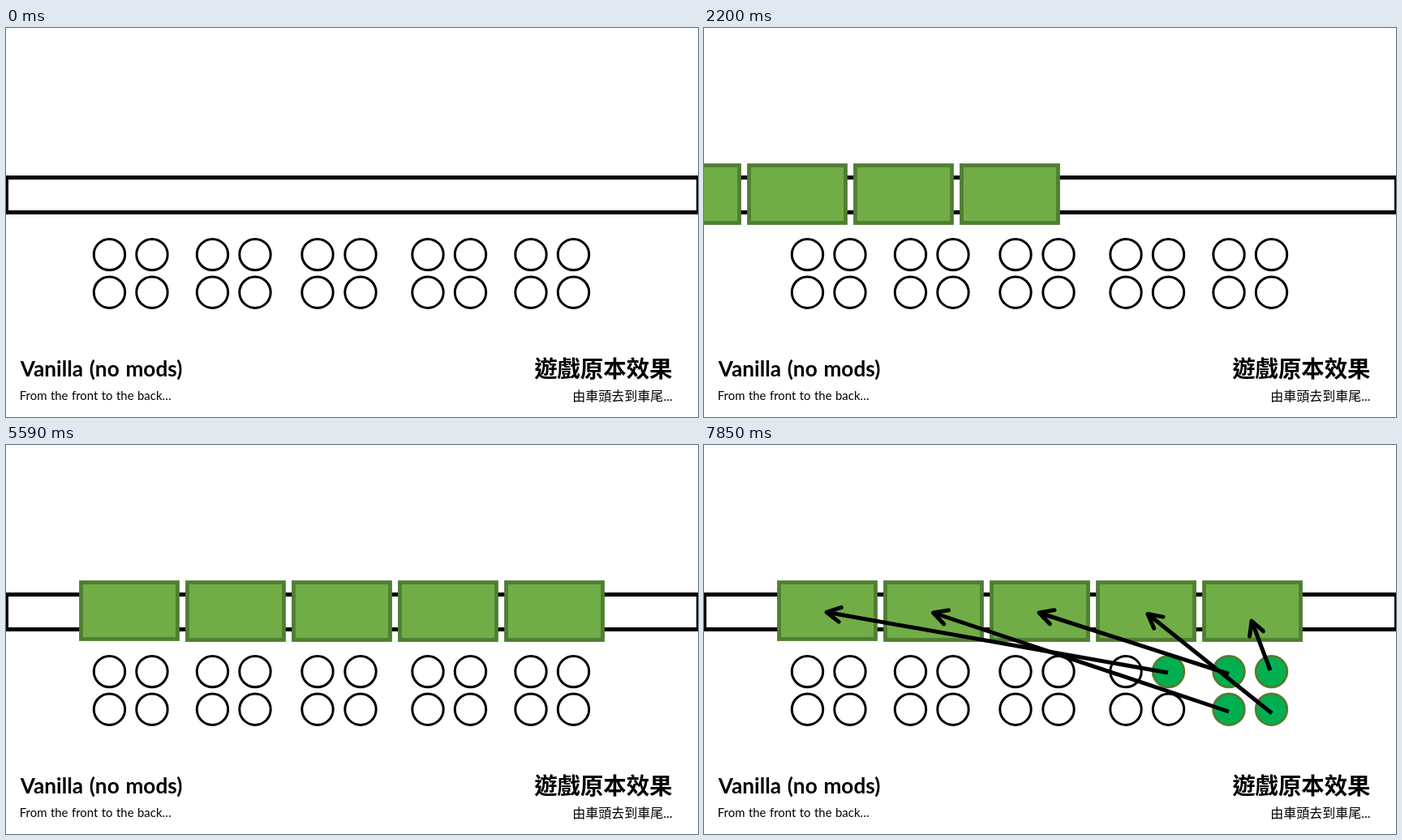
Write an HTML page that moves like this. It is 853 px wide and 480 px high and loops after 8000 ms.

```html
<!DOCTYPE html>
<html lang="zh-Hant">
<head>
<meta charset="utf-8">
<title>Train boarding order</title>
<style>
  html, body { margin: 0; width: 100%; height: 100%; overflow: hidden; background: #fff; }
  svg { display: block; width: 100vw; height: 100vh; }
  text { font-family: Lato, "Noto Sans CJK TC", "Noto Sans CJK JP", "Noto Sans CJK", sans-serif; }
  .track, .seat { fill: #fff; stroke: #000; }
  .track { stroke-width: 5; }
  .seat { stroke-width: 3; }
  .seat.taken { fill: #00b050; stroke: #507e32; }
  .car { fill: #70ad47; stroke: #507e32; stroke-width: 4.8; }
  .arrow { fill: none; stroke: #000; stroke-width: 5; }
  .head { stroke-linecap: round; stroke-linejoin: round; }
  .end { text-anchor: end; }
  .title { font-weight: 700; }
</style>
</head>
<body>
<svg viewBox="0 0 853 480">
  <rect class="track" x="0.5" y="184.5" width="853" height="43"/>
  <g id="train"></g>
  <g id="seats"></g>
  <g id="arrows"></g>
  <text class="title" x="17.8" y="430" font-size="26.2" word-spacing="1.4">Vanilla (no mods)</text>
  <text x="16.8" y="459" font-size="14.9" word-spacing="0.7">From the front to the back…</text>
  <text class="title end" x="821.5" y="430.5" font-size="28.4">遊戲原本效果</text>
  <text class="end" x="821.5" y="459.5" font-size="16">由車頭去到車尾...</text>
</svg>
<script>
const LOOP = 8000, FIRST_STEP = 1070, STEP = 1130;
const [train, seats, arrows] = ["train", "seats", "arrows"].map(id => document.getElementById(id));

function add(parent, tag, attrs) {
  const node = document.createElementNS("http://www.w3.org/2000/svg", tag);
  for (const name in attrs) node.setAttribute(name, attrs[name]);
  return parent.appendChild(node);
}

for (let i = 0; i < 5; i++) {
  add(train, "rect", {
    class: "car", x: 92.5 + 131 * i, y: 169.5, width: 119, height: i ? 71 : 70
  });
}

// Seats are ordered top, bottom for each column.
const seatNodes = [];
for (const x of [127.5, 180, 254.5, 307, 384, 437, 520, 572.5, 647, 699.5]) {
  for (const y of [279.6, 326.2]) {
    seatNodes.push(add(seats, "circle", { class: "seat", cx: x, cy: y, r: 19.2 }));
  }
}
const takenSeats = [14, 16, 17, 18, 19].map(i => seatNodes[i]);

function addArrow(x1, y1, x2, y2) {
  const length = Math.hypot(x2 - x1, y2 - y1);
  const ux = (x2 - x1) / length, uy = (y2 - y1) / length;
  const wing = side => `${x2 - 17 * ux - side * uy} ${y2 - 17 * uy + side * ux}`;
  add(arrows, "path", { class: "arrow", d: `M${x1} ${y1}L${x2} ${y2}` });
  add(arrows, "path", { class: "arrow head", d: `M${wing(-9)}L${x2} ${y2}L${wing(9)}` });
}
addArrow(698, 278, 675, 217);
addArrow(700, 331, 547, 208.5);
addArrow(647, 282.5, 413, 207);
addArrow(647, 329, 282.5, 207);
addArrow(572, 281, 151, 206.3);

// Train offset from its stop, one entry per step.
const offsets = [-900, -636, -299, -95, -24.6, 0];

function draw(now) {
  const time = now % LOOP;
  const step = time < FIRST_STEP ? 0 : 1 + Math.floor((time - FIRST_STEP) / STEP);
  train.setAttribute("transform", `translate(${offsets[Math.min(step, 5)]} 0)`);
  for (const seat of takenSeats) seat.classList.toggle("taken", step >= 6);
  arrows.style.display = step >= 7 ? "" : "none";
}

const start = performance.now();
function tick() {
  draw(performance.now() - start);
  requestAnimationFrame(tick);
}
tick();
</script>
</body>
</html>
```
